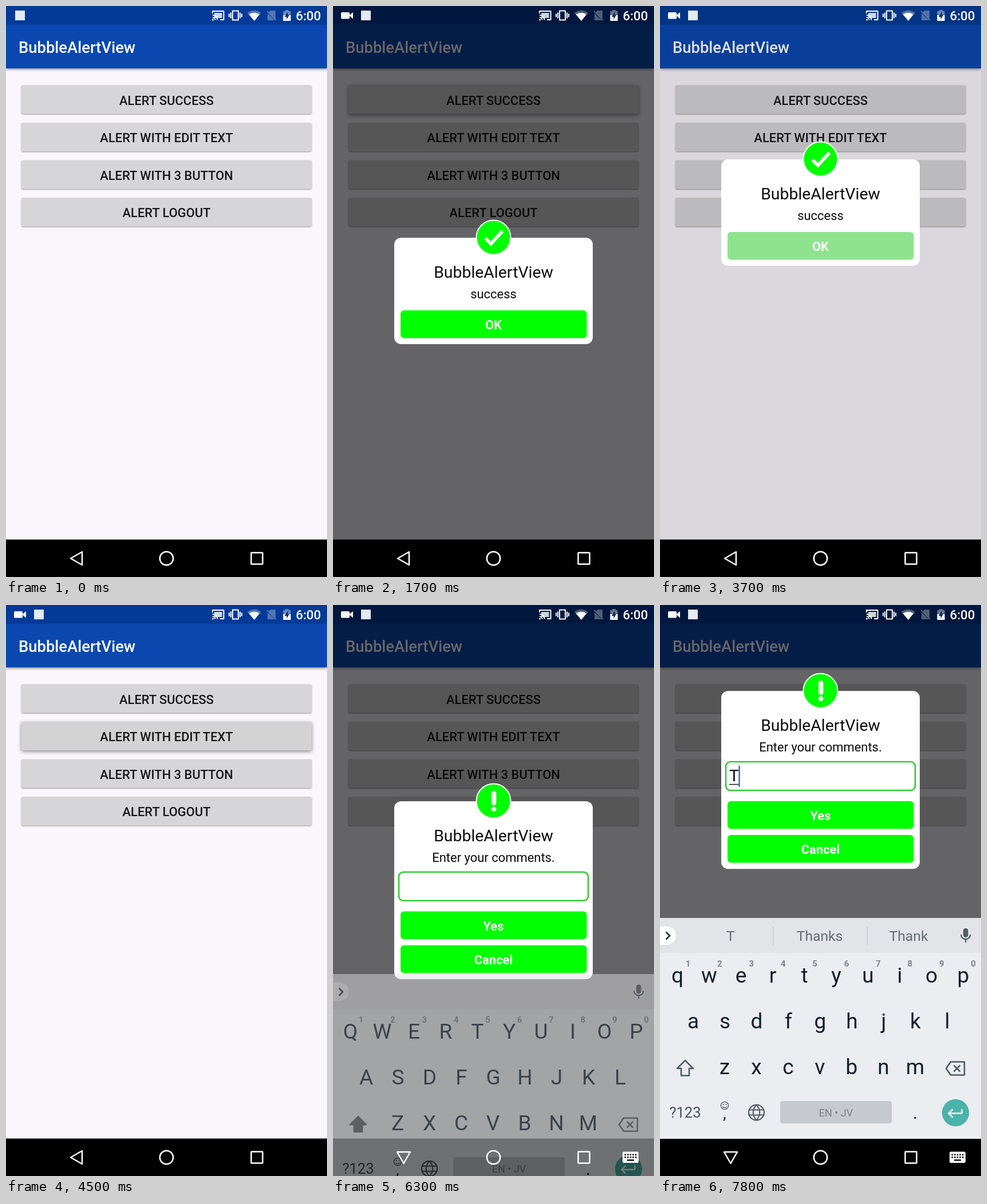
Recreate the animation shown at these times as an HTML page. Size 561 px wide and 998 px high, loop 8000 ms.

```html
<!DOCTYPE html>
<html lang="en">
<meta charset="utf-8">
<title>BubbleAlertView</title>
<style>
  html, body { margin: 0; width: 100%; height: 100%; overflow: hidden; background: #000 }
  svg { display: block; width: 100vw; height: 100vh; font-family: Roboto, sans-serif }
  text { white-space: pre }
  .line { fill: none; stroke: #fff; stroke-width: 2.5; stroke-linejoin: round }
  .grey { fill: none; stroke: #505b62; stroke-width: 2.6 }
  .raised { filter: drop-shadow(0 1px 1.2px #0006) }
  .raised.pressed { fill: #d3d3d3; filter: drop-shadow(0 2px 3px #0007) }
</style>
<svg id="stage" viewBox="0 0 561 998"></svg>
<script>
const LOOP = 8000;

const text = (s, x, y, size, fill, weight = 400, anchor = 'middle') =>
  `<text x="${x}" y="${y}" font-size="${size}" fill="${fill}" font-weight="${weight}" text-anchor="${anchor}">${s}</text>`;
const rect = (x, y, w, h, fill, rx = 0, extra = '') =>
  `<rect x="${x}" y="${y}" width="${w}" height="${h}" rx="${rx}" fill="${fill}" ${extra}/>`;
const path = (d, attrs) => `<path d="${d}" ${attrs}/>`;
const circle = (x, y, r, attrs) => `<circle cx="${x}" cy="${y}" r="${r}" ${attrs}/>`;
const group = (id, body) => `<g id="${id}">${body}</g>`;

function appScreen() {
  const labels = ['ALERT SUCCESS', 'ALERT WITH EDIT TEXT', 'ALERT WITH 3 BUTTON', 'ALERT LOGOUT'];
  return rect(0, 0, 561, 933, '#f9f7fb') +
    rect(0, 32, 561, 77, '#0a48b0', 0, 'style="filter:drop-shadow(0 2px 2px #0006)"') +
    rect(0, 0, 561, 32.7, '#033a97') +
    text('BubbleAlertView', 22, 81.5, 27.4, '#fff', 500, 'start') +
    labels.map((label, i) => {
      const y = 138.5 + i * 65.6;
      return rect(27, y, 507, 50, '#d6d5d8', 2.5, `class="raised" id="button${i}"`) +
        text(label, 280.5, y + 34, 21.9, '#17171a', 500);
    }).join('');
}

function statusIcons() {
  return group('camera', rect(14, 11, 15, 11.5, '#fff', 1.5) + path('M28 16.5L35 11v11.5z', 'fill="#fff"')) +
    rect(16, 8, 17, 17, '#e4e9f2', 0, 'id="badge"') +
    path('M361 13V9H380.500V24H374M361 16a8.500 8.500 0 0 1 8.500 8.500M361 20a4.500 4.500 0 0 1 4.500 4.500', 'class="line" style="stroke-width:2"') +
    rect(364, 12, 13.5, 9, '#fff', 0, 'opacity=".8"') + circle(361.5, 24, 1.5, 'fill="#fff"') +
    path('M396 8.500H406V24.500H396zM393 11.500V21.500M409 11.500V21.500M390 13.500V19.500M412 13.500V19.500', 'class="line" style="stroke-width:2"') +
    path('M421.500 12Q434 3 446 12L434 26z', 'fill="#fff" opacity=".3"') +
    path('M424.500 14.500Q434 9 443 14.500L434 26z', 'fill="#fff"') +
    path('M462 8H471V23L459 11zM457 13L470 25H457z', 'fill="#fff" opacity=".3"') +
    path('M456 9L472 25', 'stroke="#fff" stroke-width="1.800" opacity=".3"') +
    path('M488 7H494V9H497.500V26H484.500V9H488z', 'fill="#fff" opacity=".4"') +
    rect(484.5, 16, 13, 10, '#fff') + path('M492.500 10L487 19H490.500V24L495 15.500H492.500z', 'fill="#0a2a60"') +
    text('6:00', 528.5, 24.5, 22.3, '#fff', 500);
}

function dialog(id, height, message, icon, buttons, extra = '') {
  return group(id,
    rect(107, 0, 347, height, '#fff', 12) +
    circle(280.5, -0.5, 30, 'fill="#0f0" stroke="#fff" stroke-width="2"') + icon +
    text('BubbleAlertView', 280.5, 69.5, 28.4, '#0c0c0c') +
    text(message, 280.5, 105.5, 21.95, '#0c0c0c') + extra +
    buttons.map(([label, y]) => rect(118, y, 325.5, 48.5, '#0f0', 6, `class="action"`) +
      text(label, 280.5, y + 33, 21.95, '#fff', 700)).join(''));
}

function letterRows() {
  return [['qwertyuiop', 30.5, 660], ['asdfghjkl', 58, 740], ['zxcvbnm', 113, 820]]
    .map(([keys, x, y]) => [...keys].map((key, i) =>
      text(key, x + i * 55.5, y, 37, '#0f1f2b').replace('<text', '<text class="letter"')).join('')).join('');
}

function keyboard() {
  const hints = [...'1234567890'].map((n, i) => text(n, 49 + i * 55.4, 632, 15, '#80868b', 700)).join('');
  const suggestions = [['T', 123], ['Thanks', 279], ['Thank', 434.5]]
    .map(([word, x]) => text(word, x, 587, 24.7, '#666c70')).join('');
  return rect(0, 547, 561, 386, '#ebedf0') + rect(0, 547, 561, 61, '#e2e4e8') +
    path('M0 561.500H11.500a16 16 0 0 1 0 32.500H0z', 'fill="#fff"') +
    path('M10.500 571.500L17 578L10.500 584.500', 'class="grey" style="stroke:#22303a"') +
    group('suggestions', suggestions + rect(197, 562, 1.3, 32, '#c3c7cb') + rect(361.5, 562, 1.3, 32, '#c3c7cb')) +
    rect(530, 565, 8.5, 16, '#525c63', 4.2) +
    path('M526 576a8.200 8.200 0 0 0 16.400 0M534.200 584V590', 'class="grey" style="stroke-width:2.200"') +
    hints + letterRows() +
    path('M44 796L58 810H51V822.500H37V810H30z', 'id="shift" class="grey" stroke-linejoin="round"') +
    path('M500 810L508 798.500H532V821.500H508zM513.500 804.500L524.500 815.500M524.500 804.500L513.500 815.500', 'class="grey" stroke-linejoin="round"') +
    text('?123', 44, 896, 25.5, '#45515a') +
    circle(113, 875, 6.6, 'class="grey" style="stroke-width:1.300"') +
    path('M109.500 876.500a3.800 3.800 0 0 0 7 0M110.500 872v2M115.500 872v2', 'class="grey" style="stroke-width:1.400"') +
    text(',', 113, 898, 27, '#0f1f2b') +
    circle(168.5, 887, 13.5, 'class="grey" style="stroke-width:2.200"') +
    path('M156 882.500H181M156 891.500H181M168.500 873.500Q157 887 168.500 900.500Q180 887 168.500 873.500', 'class="grey" style="stroke-width:2"') +
    rect(210, 867, 195, 39, '#c6c9cd', 4) + text('EN • JV', 307.5, 893.5, 18, '#7c8388') +
    text('.', 446, 898, 30, '#0f1f2b') +
    circle(516.5, 887.5, 23.7, 'fill="#4bb3a9"') +
    path('M527.500 881V888.500H505M511.500 881.500L504.500 888.500L511.500 895.500', 'class="line"');
}

function navIcons() {
  const dots = [0, 1, 2, 3, 4, 5, 6, 7, 8, 9]
    .map(i => rect(509.5 + i % 5 * 4.6, i < 5 ? 959.5 : 964, 2.6, 2.6, '#111')).join('');
  return path('M-10.500 0L9.500 -11.500V11.500z', 'id="back" class="line"') +
    circle(280.5, 965.5, 11.7, 'class="line"') +
    rect(428.5, 955.5, 20, 20, 'none', 0.5, 'class="line"') +
    group('imeIcon', rect(506, 955.5, 28, 19.5, '#fff', 2.5) + dots + rect(514, 969, 12, 2.6, '#111'));
}

const tick = path('M266.500 1L276 10.500L296 -11.500', 'fill="none" stroke="#fff" stroke-width="6"');
const bang = rect(277, -18, 8.4, 25, '#fff', 4.2) + circle(281.2, 13.5, 4.3, 'fill="#fff"');
const field = rect(115, 123.7, 331, 50, '#fff', 8, 'stroke="#34c934" stroke-width="2.6"') +
  group('typed', text('T', 121, 158, 28.2, '#0c0c0c', 400, 'start') + rect(121, 162.5, 17, 1.6, '#222')) +
  rect(0, 130.5, 2.4, 37, '#2f6cc0', 0, 'id="cursor"');

const stage = document.getElementById('stage');
stage.innerHTML = appScreen() +
  rect(0, 0, 561, 933, '#000', 0, 'id="dim"') + statusIcons() +
  rect(0, 932.5, 561, 66, '#000') +
  dialog('success', 186, 'success', tick, [['OK', 127]]) +
  dialog('comment', 311, 'Enter your comments.', bang, [['Yes', 192.5], ['Cancel', 251.7]], field) +
  group('keyboard', keyboard()) + navIcons();

const el = id => document.getElementById(id);
const okButton = el('success').querySelector('.action');
const letters = [...document.querySelectorAll('.letter')];
const show = (id, on) => el(id).setAttribute('visibility', on ? 'visible' : 'hidden');
const move = (id, x, y) => el(id).setAttribute('transform', `translate(${x} ${y})`);
const progress = (t, from, to) => Math.min(1, Math.max(0, (t - from) / (to - from)));
const between = (t, from, to) => t >= from && t < to;
const easeOut = k => 1 - (1 - k) ** 2.2;

function draw(t) {
  show('camera', t >= 100);
  move('badge', t >= 100 ? 33 : 0, 0);
  el('button0').classList.toggle('pressed', between(t, 1200, 3600));
  el('button1').classList.toggle('pressed', between(t, 4400, 4900));

  // Dialogs drop in from the top; the first one leaves upwards.
  const enter1 = easeOut(progress(t, 1400, 1700));
  const enter2 = easeOut(progress(t, 4500, 4700));
  const leaving = Math.max(0, (t - 3600) / 100);
  move('success', 0, 405 - 620 * (1 - enter1) - 137 * leaving ** 2);
  show('success', between(t, 1401, 4000));
  okButton.setAttribute('fill', t >= 3500 ? '#8fe38f' : '#0f0');

  const lift = 192.7 * easeOut(progress(t, 6300, 6600));
  move('comment', 0, 343 - 700 * (1 - enter2) - lift);
  show('comment', t > 4500);
  const dim = t < 4400 ? 0.595 * enter1 - 0.47 * leaving : 0.595 * enter2;
  el('dim').setAttribute('opacity', Math.max(0, dim));

  const typed = t >= 7700;
  show('typed', typed);
  move('cursor', typed ? 137.4 : 121, 0);
  show('cursor', between(t, 4501, 5100) || between(t, 5500, 6000) || between(t, 6600, 7100) || t >= 7600);

  const turn = progress(t, 5800, 6100);
  el('back').setAttribute('transform', `translate(123.5 965.5) rotate(${-90 * turn})`);
  el('imeIcon').setAttribute('opacity', turn);

  const rise = easeOut(progress(t, 6200, 6600));
  move('keyboard', 0, 185 * (1 - rise));
  el('keyboard').setAttribute('opacity', rise);
  show('suggestions', typed);
  el('shift').style.fill = typed ? 'none' : '#505b62';
  for (const letter of letters) {
    const key = letter.textContent;
    letter.textContent = typed ? key.toLowerCase() : key.toUpperCase();
  }
}

function frame() {
  draw(Math.floor(performance.now() % LOOP / 100) * 100);
  requestAnimationFrame(frame);
}
frame();
</script>
</html>
```
